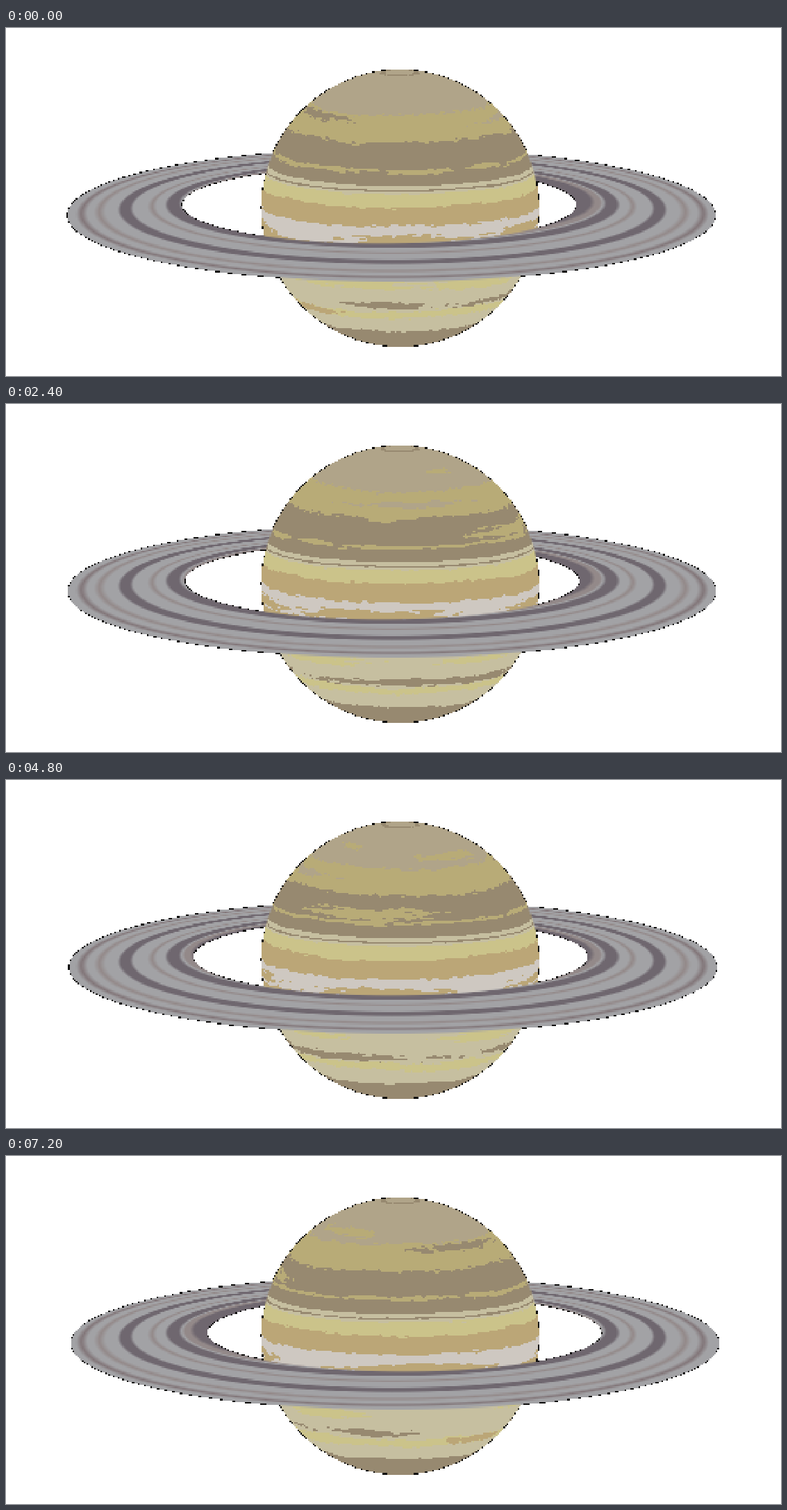
Recreate the animation shown at these times as an HTML page with a canvas. Size 1116x502 px, loop 8000 ms.

```html
<!DOCTYPE html>
<html lang="en">
<head>
<meta charset="utf-8">
<title>Ringed planet</title>
<style>
html, body { margin: 0; width: 100%; height: 100%; overflow: hidden; background: #fff; }
canvas { display: block; width: 100%; height: 100%; image-rendering: pixelated; }
</style>
</head>
<body>
<canvas id="view" width="500" height="225"></canvas>
<script>
const W = 500, H = 225, SCALE = 1116 / W;
const STEP = 800, STEPS = 10, TURN = 28;
const R = 199.5, CX = 567.5, CY = 260, TILT = 9 * Math.PI / 180;
const DEG = 180 / Math.PI;
const ctx = document.getElementById('view').getContext('2d');
const image = ctx.createImageData(W, H);

const TAN = [176, 164, 137], KHAKI = [184, 171, 119], DARK = [151, 137, 112],
  PALE = [198, 191, 160], YELLOW = [203, 195, 138], OCHRE = [187, 166, 119],
  WHITE = [206, 200, 193];
const GRAY = [162, 162, 165], BROWN = [147, 137, 137], DUSK = [130, 118, 121],
  SLATE = [111, 103, 111];

// Cloud bands: lower edge on the central meridian, colour
const bands = [
  [67.5, TAN], [69.3, DARK], [128, TAN], [167, KHAKI], [228, DARK], [234, PALE],
  [236.5, DARK], [240, PALE], [260, YELLOW], [287, OCHRE], [315, WHITE],
  [345, OCHRE], [409, PALE], [419, YELLOW], [438, PALE], [999, DARK]
];

// Cloud patches: longitude, height, half length, half thickness, colour
const patches = [
  [122, 100, 17, 5, KHAKI], [210, 114, 32, 8, KHAKI], [298, 136, 34, 7, DARK],
  [90, 146, 40, 5, TAN], [150, 195, 42, 9, KHAKI],
  [75, 307, 42, 11, OCHRE], [5, 308, 30, 9, OCHRE],
  [160, 309, 38, 9, OCHRE], [257, 309, 42, 9, OCHRE],
  [335, 370, 30, 11, YELLOW], [39, 371, 32, 11, YELLOW],
  [122, 374, 22, 5, YELLOW], [213, 373, 26, 10, YELLOW],
  [353, 401, 25, 6, DARK], [115, 402, 85, 6, DARK], [239, 401, 26, 6, DARK],
  [305, 415, 27, 5, OCHRE]
];

// Ring shades along the radius
const shades = [
  [255, SLATE], [285, SLATE], [292, BROWN], [299, BROWN], [303, GRAY], [308, SLATE],
  [323, SLATE], [328, GRAY], [340, GRAY], [346, BROWN], [353, GRAY], [373, GRAY],
  [378, SLATE], [391, SLATE], [396, GRAY], [413, GRAY], [422, BROWN], [430, GRAY],
  [439, GRAY], [448, DUSK], [456, GRAY], [470, GRAY]
];

const clamp = v => Math.max(0, Math.min(1, v));
const mix = (a, b, t) => a.map((v, i) => v + (b[i] - v) * t);

function hash(x, y) {
  let h = Math.imul(x, 374761393) + Math.imul(y, 668265263);
  h = Math.imul(h ^ (h >>> 13), 1274126177);
  return ((h ^ (h >>> 16)) >>> 0) / 4294967296;
}

// Smooth noise that wraps around the planet
function noise(lon, v, cells, height) {
  const x = lon / 360 * cells, y = v / height;
  const i = Math.floor(x), j = Math.floor(y);
  const ease = t => t * t * (3 - 2 * t);
  const u = ease(x - i), w = ease(y - j);
  const at = (a, b) => hash((a + cells) % cells, b + 7);
  const top = at(i, j) * (1 - u) + at(i + 1, j) * u;
  const low = at(i, j + 1) * (1 - u) + at(i + 1, j + 1) * u;
  return top * (1 - w) + low * w;
}

function cloud(lon, v) {
  const fine = noise(lon, v, 130, 2.3) - 0.5;
  const slow = noise(lon, v, 14, 14) - 0.5;
  const streak = noise(lon, v, 36, 2.6) - 0.5;
  const thin = v < 75 || (v > 222 && v < 242);
  const rough = thin ? 1.2 : v < 222 ? 7 : v > 425 ? 3 : 5;
  const u = v + rough * (slow + fine);
  let color = bands.find(b => u < b[0])[1];
  if (v > 201 && v < 213) {
    const edge = 1 - Math.abs(v - 207) / 6;
    if (edge * 0.7 + noise(lon, v, 26, 4) * 0.9 + fine * 0.5 > 0.88) color = KHAKI;
  }
  for (const [pl, pv, length, depth, tint] of patches) {
    const d = (lon - pl + 540) % 360 - 180;
    const near = 1 - Math.hypot(d / length, (v - pv) / depth);
    if (near > -0.4 && near + fine * 0.6 + streak * 0.7 + slow * 0.3 > 0.15) color = tint;
  }
  return color;
}

function planetColor(x, y, step) {
  let px = (x - CX) / R, py = (CY - y) / R;
  const len = Math.hypot(px, py);
  if (len > 0.999) { px *= 0.999 / len; py *= 0.999 / len; }
  const pz = Math.sqrt(1 - px * px - py * py);
  const up = py * Math.cos(TILT) + pz * Math.sin(TILT);
  const out = pz * Math.cos(TILT) - py * Math.sin(TILT);
  const lon = Math.atan2(px, out) * DEG + step * TURN;
  const v = CY - R * Math.sin(Math.asin(up) - TILT);
  return cloud((lon + 360) % 360, v);
}

// Radius of the ring ellipse that passes through a point
function ringRadius(x, y) {
  let lo = 200, hi = 470;
  for (let n = 0; n < 12; n++) {
    const a = (lo + hi) / 2, gap = 467 - a;
    const u = (x - 556.5) / a;
    const w = (y - 270 + 0.106 * gap) / (96 - 0.239 * gap);
    if (u * u + w * w > 1) lo = a; else hi = a;
  }
  return lo;
}

function ringColor(a) {
  const i = shades.findIndex(s => s[0] > a);
  if (i < 1) return shades[i < 0 ? shades.length - 1 : 0][1];
  const [a0, c0] = shades[i - 1], [a1, c1] = shades[i];
  return mix(c0, c1, (a - a0) / (a1 - a0));
}

// Share of a cell that lies inside an ellipse
function cover(x, y, cx, cy, a, b) {
  const u = (x - cx) / a, w = (y - cy) / b;
  const f = Math.hypot(u, w);
  if (f < 0.5) return 1;
  const dist = (f - 1) * f / Math.hypot(u / a, w / b);
  return clamp(0.5 - dist / SCALE);
}

const ringMap = Array.from({ length: W * H }, (_, i) =>
  ringColor(ringRadius((i % W + 0.5) * SCALE, (Math.floor(i / W) + 0.5) * SCALE)));

function shade(x, y, i, step) {
  const k2 = step * step;
  const p = cover(x, y, CX, CY, R, R);
  const r = cover(x, y, 555 + 0.065 * k2, 270, 466.5, 96) *
    (1 - cover(x, y, 537.5 + 0.45 * k2, 255, 284.5, 56));
  const alpha = 1 - (1 - p) * (1 - r);
  if (alpha < 0.12) return [255, 255, 255];
  if (alpha < 0.44) return [12, 11, 10];
  const ring = ringMap[i];
  if (!p) return ring;
  const ball = planetColor(x, y, step);
  return y > 258 ? mix(ball, ring, r / alpha) : mix(ring, ball, p / alpha);
}

function draw(step) {
  for (let i = 0; i < W * H; i++) {
    const x = (i % W + 0.5) * SCALE, y = (Math.floor(i / W) + 0.5) * SCALE;
    const c = shade(x, y, i, step);
    image.data.set([c[0], c[1], c[2], 255], i * 4);
  }
  ctx.putImageData(image, 0, 0);
}

let shown = -1;
function tick() {
  const step = Math.floor(performance.now() / STEP) % STEPS;
  if (step !== shown) draw(shown = step);
  requestAnimationFrame(tick);
}
tick();
</script>
</body>
</html>
```
